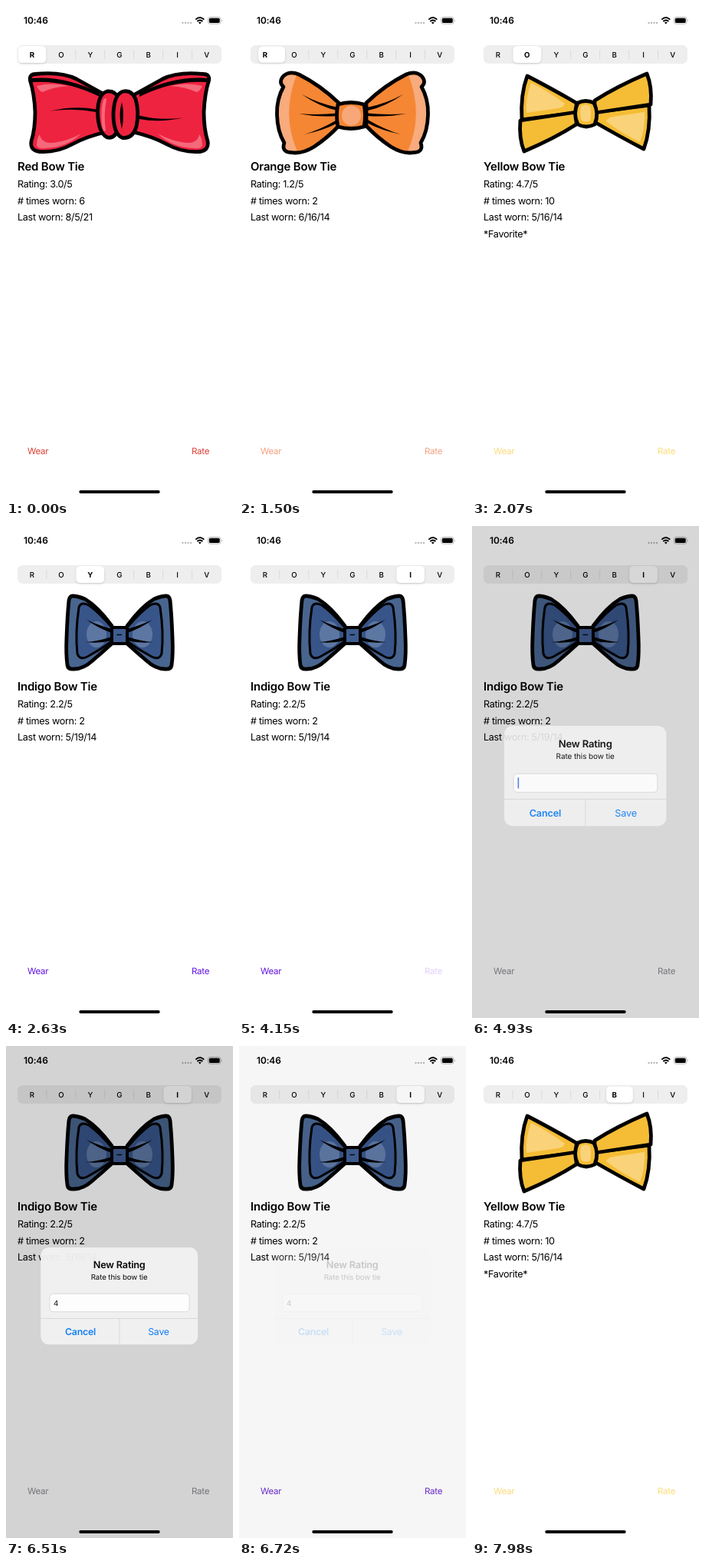
Animation, 296 px wide and 640 px high, one loop 8000 ms. Source, as an HTML page:

```html
<!DOCTYPE html>
<html lang="en">
<head>
<meta charset="utf-8">
<title>Bow ties</title>
<style>
  html, body { margin: 0; width: 100%; height: 100%; overflow: hidden; background: #fff; }
  svg { display: block; width: 296px; height: 640px; }
  text { font-family: Inter, Roboto, sans-serif; text-rendering: geometricPrecision; }
  .mid { text-anchor: middle; }
  .time { font-size: 12px; font-weight: 600; letter-spacing: -.15px; }
  .seg { font-size: 9.7px; font-weight: 500; }
  .seg.on { font-weight: 700; }
  .name { font-size: 15px; font-weight: 600; letter-spacing: -.2px; }
  .info { font-size: 12.7px; letter-spacing: -.34px; }
  .btn { font-size: 11.5px; letter-spacing: -.25px; }
  .head { font-size: 12.7px; font-weight: 600; letter-spacing: -.2px; }
  .note { font-size: 9.7px; letter-spacing: -.1px; }
  .act { font-size: 12.3px; letter-spacing: -.2px; fill: #0a7cf8; }
  .ink { stroke: #000; stroke-width: 4.8; stroke-linejoin: round; stroke-linecap: round; }
  .line { fill: none; }
</style>
</head>
<body>
<svg viewBox="0 0 296 640" xmlns="http://www.w3.org/2000/svg">
  <defs>
    <g id="redWing">
      <path class="ink" fill="#ee2340" d="M31.500 97Q30 89 38 88.500Q72 85 92 95L130 116V164Q104 170 86 180Q66 191 44 189.500Q31 188 33 176Q38 160 38 138Q37 114 31.500 97Z"/>
      <path fill="#f4697b" d="M40 104Q58 99 82 104Q62 105 48 112Q43 111 40 104ZM40 182Q40 172 44 167Q46 179 62 178Q82 175 98 166Q80 184 50 185Q43 186 40 182Z"/>
      <path d="M33 94Q76 90 122 113V118Q78 96 34 99Z"/>
    </g>
    <path id="orangeEdge" d="M130 126Q106 103 78 89Q66 84 58 91Q51 99 58 105Q49 121 49.500 141Q50 163 59 178Q55 190 68 190.500Q82 193 98 183Q116 171 130 156Z"/>
    <g id="orangeWing">
      <use href="#orangeEdge" fill="#f58634"/>
      <path fill="#f8ab7c" d="M75 90Q55 141 76 189Q54 194 59 178Q40 140 58 105Q48 86 75 90Z"/>
      <use href="#orangeEdge" class="ink line"/>
      <path d="M129 132Q104 127 82 115Q105 131 128 136ZM128 139.500Q104 142 78 140Q104 145 128 143ZM128 148Q106 161 85 167Q110 162 129 152Z"/>
    </g>
    <g id="blueWing">
      <path class="ink" fill="#48658f" d="M138 130Q120 105 103 95Q93 91 87 91Q83 91 82 97Q80 117 79 145Q78 166 80 181Q81 187 89 186Q101 186 113 175Q126 164 138 153Z"/>
      <path class="ink" style="stroke-width:3" fill="#38558a" d="M138 132Q122 113 108 103Q97 98 95 106Q90 139 93 166Q96 175 106 170Q123 161 138 150Z"/>
      <ellipse cx="118" cy="141" rx="13" ry="17" fill="#5d77a3"/>
      <path d="M138 134Q123 130 105 122Q122 134 138 139ZM138 144Q120 150 104 151Q122 153 138 149Z"/>
    </g>
    <g id="goldWing">
      <path class="ink" fill="#f5bd35" d="M72 91Q103 107 136 126V139L65 148Q63 115 72 91Z"/>
      <path fill="#fad27a" d="M77 100Q100 111 121 127Q119 132 112 133L71 139Q70 118 77 100Z"/>
      <path class="ink" fill="#f5bd35" d="M63 149L136 138V154Q108 172 68 189Q61 172 63 149Z"/>
    </g>
    <filter id="soft" x="-30%" y="-30%" width="160%" height="180%">
      <feDropShadow dx="0" dy="1.2" stdDeviation="1.6" flood-opacity=".16"/>
    </filter>
  </defs>
  <rect width="296" height="640" fill="#fff"/>

  <text class="time" x="23" y="23">10:46</text>
  <path d="M230.500 22H242" stroke="#b4b4b6" stroke-width="2.3" stroke-linecap="round" stroke-dasharray="0 3.500"/>
  <path class="line" stroke="#000" stroke-width="1.9" d="M247.300 17.600Q252.800 12.600 258.300 17.600M249.300 20Q252.800 16.900 256.300 20"/>
  <path d="M252.800 23.500L250.900 21.400Q252.800 19.900 254.700 21.400Z"/>
  <rect x="263.500" y="14.500" width="16.500" height="8.700" rx="2.6" fill="none" stroke="#a5a5a5" stroke-width=".8"/>
  <rect x="264.800" y="15.800" width="13.900" height="6.100" rx="1.6"/>
  <path d="M281 17.500Q282.700 18.900 281 20.300Z" fill="#a5a5a5"/>

  <rect x="15" y="51" width="266" height="24" rx="6.5" fill="#eeeeef"/>
  <g id="bars"></g>
  <rect id="thumb" x="-18.200" y="-11" width="36.400" height="22" rx="5.4" fill="#fff" filter="url(#soft)"/>
  <g id="labels"></g>

  <g class="tie">
    <use href="#redWing"/><use href="#redWing" transform="matrix(-1 0 0 1 296 0)"/>
    <path d="M58 136.500Q90 129 118 134.500V138Q88 132.500 58 136.500ZM174 142.500Q198 149 231 145.500Q200 152 174 147Z"/>
    <path class="ink" fill="#ee2340" d="M132 111Q120 114 119.500 138Q120 165 132 171Q143 173 146 158V119Q142 110 132 111Z"/>
    <path fill="#f4697b" d="M127 122Q131 118 131 122Q127 141 130 162Q126 165 125 153Q123 135 127 122Z"/>
    <path class="ink" fill="#ee2340" d="M153 111Q141 114 140 140Q140 167 152 171.500Q165 173 170 157Q174 138 169 121Q164 109 153 111Z"/>
    <path d="M151 125Q155 142 151 160Q146 142 151 125Z"/>
  </g>
  <g class="tie">
    <use href="#orangeWing"/><use href="#orangeWing" transform="matrix(-1 0 0 1 296 0)"/>
    <path class="ink" fill="#f58634" d="M129 128Q146 123 163 128Q166 142 163 157Q146 162 129 157Q126 142 129 128Z"/>
    <ellipse cx="146.500" cy="142.500" rx="12.500" ry="13" fill="#f8a878"/>
  </g>
  <g class="tie">
    <use href="#goldWing"/><use href="#goldWing" transform="rotate(180 148 138.500)"/>
    <path class="ink" fill="#f5bd35" d="M138 126Q148 121 159 126Q166 140 160 154Q149 160 138 154Q131 140 138 126Z"/>
    <path fill="#fad27a" d="M142 130Q148 127 154 130Q156 140 154 149Q148 152 143 149Q140 140 142 130Z"/>
  </g>
  <g class="tie">
    <use href="#blueWing"/><use href="#blueWing" transform="matrix(-1 0 0 1 296 0)"/>
    <rect class="ink" style="stroke-width:4" x="138" y="132" width="20" height="21" fill="#3f5d91"/>
    <path d="M144.500 141.500H151" stroke="#000" stroke-width="1.3"/>
  </g>

  <text id="name" class="name" x="15" y="214"></text>
  <g id="info"></g>
  <text id="wear" class="btn" x="28" y="583">Wear</text>
  <text id="rate" class="btn" x="242" y="583">Rate</text>

  <rect id="dim" width="296" height="640"/>
  <g id="alert">
    <rect x="45.300" y="262" width="204.800" height="126.300" rx="10.500" fill="#f2f2f2"/>
    <text class="head mid" x="147.700" y="289">New Rating</text>
    <text class="note mid" x="147.700" y="304">Rate this bow tie</text>
    <rect x="57" y="322.300" width="182" height="23.400" rx="4.500" fill="#fff" stroke="#cfcfd1" stroke-width=".7"/>
    <text id="typed" class="note" x="62" y="337.700">4</text>
    <rect id="caret" x="62.300" y="327" width="1.500" height="14" rx=".7" fill="#4470e6"/>
    <path d="M45.300 354.500H250.100M147.900 354.500V388.300" stroke="#d0d0d2" stroke-width=".7"/>
    <text class="act mid" x="97" y="376.300" font-weight="600">Cancel</text>
    <text class="act mid" x="199" y="376.300">Save</text>
  </g>
  <rect x="95.300" y="630" width="105.400" height="4" rx="2"/>
</svg>
<script>
const LOOP = 8000, STEP = 110, SLIDE = 320;
const PRESS = 4150, OPEN = 4380, FOCUS = 4820, SAVE = 6410, SAVED = 6830;
const GREY = [140, 138, 146];
const NS = 'http://www.w3.org/2000/svg';

const ties = [
  { name: 'Red', tint: [222, 62, 54], rating: '3.0', worn: 6, last: '8/5/21' },
  { name: 'Orange', tint: [244, 160, 129], rating: '1.2', worn: 2, last: '6/16/14' },
  { name: 'Yellow', tint: [251, 219, 122], rating: '4.7', worn: 10, last: '5/16/14', fav: true },
  { name: 'Indigo', tint: [98, 18, 226], rating: '2.2', worn: 2, last: '5/19/14' }
];

// lead: how far the thumb is already under way when the tie changes
const taps = [
  { at: -SLIDE, seg: 0, tie: 0 },
  { at: 1500, seg: 1, tie: 1, lead: 100 },
  { at: 2070, seg: 2, tie: 2 },
  { at: 2630, seg: 5, tie: 3 },
  { at: 7860, seg: 2, tie: 2 }
];

const $ = id => document.getElementById(id);
const segX = i => 33.9 + 37.95 * i;
const clamp = x => Math.max(0, Math.min(1, x));
const lerp = (a, b, p) => a + (b - a) * p;
const ease = x => { const c = clamp(x); return c * c * (3 - 2 * c); };
const hold = ms => Math.floor(ms / STEP) * STEP;

function add(parent, tag, attrs, text = '') {
  const el = document.createElementNS(NS, tag);
  for (const k in attrs) el.setAttribute(k, attrs[k]);
  el.textContent = text;
  parent.append(el);
  return el;
}

function put(el, text) {
  if (el.textContent !== text) el.textContent = text;
}

const labels = [...'ROYGBIV'].map((c, i) =>
  add($('labels'), 'text', { class: 'seg mid', x: segX(i), y: 66.6 }, c));
const bars = labels.slice(1).map((_, i) =>
  add($('bars'), 'rect', { x: segX(i + .5) - .4, y: 57, width: .8, height: 12, fill: '#d5d5d8' }));
const info = [0, 1, 2, 3].map(i => add($('info'), 'text', { class: 'info', x: 15, y: 236.4 + 21.5 * i }));
const art = document.querySelectorAll('.tie');

function drawTie(index, t) {
  const tie = ties[index];
  const rating = index === 3 && t >= SAVED ? '4.0' : tie.rating;
  art.forEach((g, i) => { g.style.display = i === index ? '' : 'none'; });
  put($('name'), tie.name + ' Bow Tie');
  put(info[0], `Rating: ${rating}/5`);
  put(info[1], `# times worn: ${tie.worn}`);
  put(info[2], `Last worn: ${tie.last}`);
  put(info[3], tie.fav ? '*Favorite*' : '');
}

function drawThumb(pos) {
  const size = Number.isInteger(pos) ? 1 : .95;
  $('thumb').setAttribute('transform', `translate(${segX(pos)} 63) scale(${size})`);
  labels.forEach((el, i) => el.classList.toggle('on', Math.abs(i - pos) < .3));
  bars.forEach((el, i) => { el.style.opacity = Math.abs(i + .5 - pos) < .6 ? 0 : 1; });
}

function drawAlert(t, tint) {
  const enter = ease((t - OPEN) / 780);
  const p = enter * (1 - ease((t - SAVE) / (SAVED - SAVE)));
  const scale = lerp(1.15, 1, enter);
  const mix = clamp(p * 1.33);
  const blink = Math.abs((t - FOCUS) / 1000 % 1 - .75);
  const colour = `rgb(${tint.map((v, i) => Math.round(lerp(v, GREY[i], mix)))})`;
  $('wear').style.fill = $('rate').style.fill = colour;
  $('rate').style.opacity = t < PRESS ? 1 : lerp(.2, 1, ease((t - OPEN) / 250));
  $('dim').style.opacity = .2 * p;
  $('alert').style.opacity = clamp(p * 1.12);
  $('alert').setAttribute('transform', `translate(147.7 325.1) scale(${scale}) translate(-147.7 -325.1)`);
  $('caret').style.opacity = t >= FOCUS && t < SAVE ? clamp((blink - .1) / .15) : 0;
  $('typed').style.opacity = t >= SAVE ? 1 : 0;
}

function draw(t) {
  const n = taps.findLastIndex(tap => tap.at <= t);
  const tap = taps[n];
  const from = taps[Math.max(0, n - 1)].seg;
  drawTie(tap.tie, t);
  drawThumb(lerp(from, tap.seg, ease((hold(t - tap.at) + (tap.lead || 0)) / SLIDE)));
  drawAlert(t, ties[tap.tie].tint);
}

const start = performance.now();
function tick() {
  draw((performance.now() - start) % LOOP);
  requestAnimationFrame(tick);
}
tick();
</script>
</body>
</html>
```
